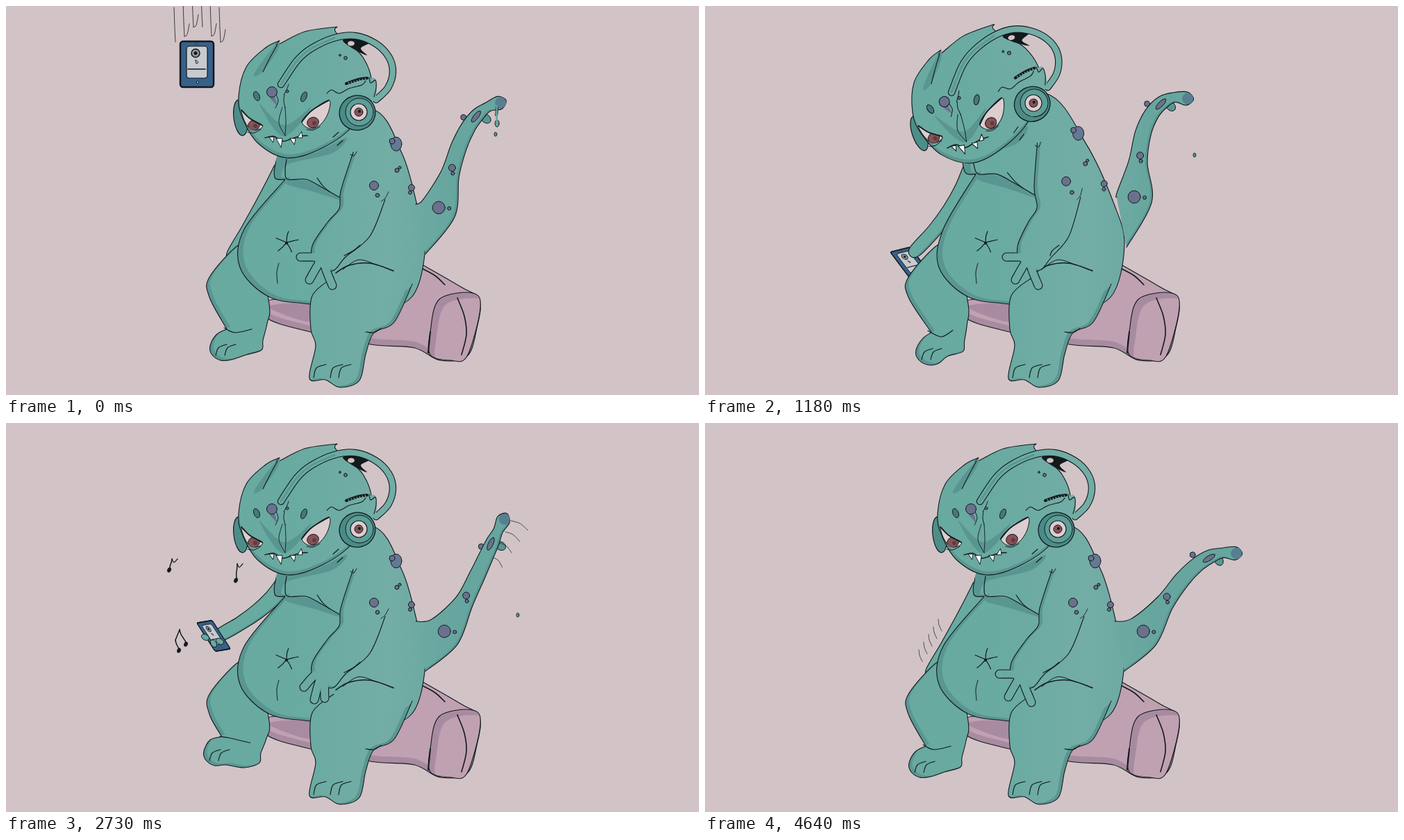
Write an HTML page with a canvas that moves like this. It is 998 by 561 pixels and loops after 4.73 s.

```html
<!DOCTYPE html>
<html lang="en">
<head>
<meta charset="utf-8">
<title>Listening monster</title>
<style>
html, body { margin: 0; width: 100%; height: 100%; overflow: hidden; background: #d2c3c6; }
canvas { display: block; }
</style>
</head>
<body>
<canvas id="stage" width="998" height="561"></canvas>
<script>
const g = document.getElementById('stage').getContext('2d');
const LOOP = 4730, STEPS = 52;
const BACKDROP = '#d2c3c6', LINE = '#121a1c', SHADE = '#5a9691', PURPLE = '#6b718d', LOG = '#bfa1b2',
  LOGSHADE = '#a88ba0', WHITE = '#dccdd0', IRIS = '#865356';
const SKIN = g.createLinearGradient(300, 0, 650, 0);
[[0, '#68a9a0'], [.35, '#69aaa1'], [.7, '#73ada6'], [1, '#66a69e']].forEach(s => SKIN.addColorStop(...s));

const clamp = v => Math.min(1, Math.max(0, v));
const ramp = (n, from, to) => clamp((n - from) / (to - from));
const mix = (a, b, u) => a.map((v, i) => v + (b[i] - v) * u);
const same = (x, y) => [x, y];
let warp = same;

// Value of a keyed track [[step, values], ...]
function at(track, n) {
  let value = track[0][1];
  for (let i = 1; i < track.length; i++) value = mix(value, track[i][1], ramp(n, track[i - 1][0], track[i][0]));
  return value;
}

// Smooth curve through points; a doubled point makes a corner
function curve(pts, closed) {
  const p = [], path = new Path2D();
  for (let i = 0; i < pts.length; i += 2) p.push(warp(pts[i], pts[i + 1]));
  const n = p.length, q = j => closed ? p[(j + n) % n] : p[Math.min(n - 1, Math.max(0, j))];
  path.moveTo(...p[0]);
  for (let i = 0; i < n - !closed; i++) {
    const [a, b, c, d] = [q(i - 1), q(i), q(i + 1), q(i + 2)];
    if (b[0] === c[0] && b[1] === c[1]) continue;
    path.bezierCurveTo(b[0] + (c[0] - a[0]) / 6, b[1] + (c[1] - a[1]) / 6,
      c[0] - (d[0] - b[0]) / 6, c[1] - (d[1] - b[1]) / 6, ...c);
  }
  return path;
}
function paint(path, fill, w, color = LINE) {
  if (fill) { g.fillStyle = fill; g.fill(path); }
  if (w) { g.lineWidth = w; g.strokeStyle = color; g.stroke(path); }
}
const ink = (pts, w = 1.1, color) => paint(curve(pts), null, w, color);
const blob = (pts, fill, w = 0) => paint(curve(pts, true), fill, w);

// Outlined shape whose shaded rim shows where its lit copy is shifted away
function form(pts, dx, dy, closed = true, fill = SKIN, shade = SHADE) {
  const path = curve(pts, closed);
  g.save();
  g.clip(path);
  paint(path, shade);
  g.translate(dx, dy);
  paint(path, fill);
  g.restore();
  paint(path, null, 1.1);
}
function oval(x, y, rx, ry, fill, w = 1, turn = 0) {
  const path = new Path2D();
  path.ellipse(...warp(x, y), rx, ry, turn, 0, 7);
  paint(path, fill, w);
}
const dot = (x, y, r, fill = PURPLE, w = 1) => oval(x, y, r, r, fill, w);

// Tapered limb along [x, y, radius] joints; base is an optional half-width vector
function limb(joints, base) {
  const left = [], right = [], last = joints.length - 1;
  let tip;
  joints.forEach(([x, y, r], i) => {
    const a = joints[Math.max(0, i - 1)], b = joints[Math.min(last, i + 1)];
    const turn = Math.atan2(b[1] - a[1], b[0] - a[0]);
    const [nx, ny] = base && !i ? base : [-Math.sin(turn) * r, Math.cos(turn) * r];
    left.push(x - nx, y - ny);
    right.unshift(x + nx, y + ny);
    tip = [x + Math.cos(turn) * r, y + Math.sin(turn) * r];
  });
  form([...left, ...tip, ...right], -3, -1, false);
}

const TAIL_LENGTHS = [40, 52, 42, 31, 23, 18, 18], TAIL_WIDTHS = [36, 26, 13.5, 11.5, 10.5, 9.5, 7, 9.5];
// [tilt, curl] in degrees
const TAIL_REST = [[7, [-18, 65]], [12, [-32, 105]], [13, [-32, 105]], [18, [-7, 68]], [22, [-7, 68]], [24, [0, 70]]];

function tailPose(n, lean) {
  const swing = (1 + Math.cos(2 * Math.PI * (n - 29) / 5.5)) / 2;
  const [tilt, curl] = n < 24 ? at(TAIL_REST, n) : [0, -95 + 165 * swing ** 1.5];
  let x = 597 + 3 * lean, y = 322 - 10 * lean;
  return TAIL_WIDTHS.map((r, i) => {
    const joint = [x, y, r];
    const heading = (-67 + 36 * .28 ** i + tilt + curl * (i / 6) ** 1.7) * Math.PI / 180;
    x += TAIL_LENGTHS[i] * Math.cos(heading);
    y += TAIL_LENGTHS[i] * Math.sin(heading);
    return joint;
  });
}

function tail(n, lean) {
  const joints = tailPose(n, lean), [, [bx, by], [mx, my], , [kx, ky], [sx, sy], , [tx, ty]] = joints;
  const turn = Math.atan2(sy - ky, sx - kx);
  dot(kx - 7, ky - 14, 4);
  oval(sx + 11, sy + 6, 6, 8, SHADE, 1, turn);
  limb(joints, [7, 36]);
  dot(bx, by - 1, 9);
  dot(bx + 15, by, 2.5);
  dot(mx + 3, my - 9, 5);
  dot(mx + 4, my - 1, 2.5);
  oval(sx - 3, sy + 3, 10, 3.5, PURPLE, 1, turn);
  dot(tx + 1, ty, 8, '#587f91', 0);
  if (n < 3) {
    ink([tx - 4, ty + 7, tx - 5, ty + 18], 4);
    ink([tx - 4, ty + 5, tx - 5, ty + 18], 2.5, SKIN);
    oval(tx - 4, ty + 30, 3, 5, SKIN);
    ink([tx - 5, ty + 16, tx - 4, ty + 30], 2.5, SKIN);
  }
  if (n <= 24) return;
  const before = tailPose(n - 1, 0);
  joints.slice(4).forEach(([x, y], i) => {
    const dx = before[i + 4][0] - x;
    if (dx > 12) ink([x + 10, y + 2, x + 14 + dx * .2, y + 6, x + 16 + dx * .4, y + 16], .7);
  });
}

// start step, x, y
const DROPS = [[0, 705, 185], [13, 705, 215], [15, 696, 245], [18, 735, 244], [29, 734, 251], [36, 710, 200], [42, 637, 219]];
function drops(n) {
  for (const [start, x0, y0] of DROPS) {
    const k = n - start, x = x0 + 3 * k, y = y0 + 22 * k + 3.9 * k * k;
    if (k < 0 || y > 640) continue;
    if (y < 525) oval(x, y, 2, 3, '#4f958c', .8);
    else for (const s of [-1, 1]) {
      ink([x + s * 3, 539, x + s * 8, 535], .8, '#9db3b2');
      ink([x, 546, x + s * 4, 543, x + s * 8, 542], 1, '#9db3b2');
    }
  }
}

function log() {
  form([596,371, 596,371, 655,405, 682,424, 678,465, 664,505, 625,511, 588,493, 525,488, 430,468, 376,450, 376,425, 560,400],
    0, -9, true, LOG, LOGSHADE);
  form([611,503, 611,470, 624,423, 672,414, 683,436, 664,505, 640,511], 9, 8, true, LOG, LOGSHADE);
  blob([380,432, 440,430, 440,455, 400,445], LOGSHADE);
  ink([650,421, 660,447, 663,474, 656,503], 1.6);
  ink([608,500, 611,470], 2);
  ink([598,378, 618,389, 632,402], 1.6);
}

// elbow x, y, hand x, y
const HANG = [372, 285, 326, 360], REACH = [340, 290, 280, 500], LIFT = [362, 295, 302, 354], HOLD = [372, 272, 308, 306];
const ARM = [[7, HANG], [10, REACH], [11, REACH], [13, LIFT], [17, HOLD], [48, HOLD], [50, HANG]];
function leftArm(n, lean) {
  const [ex, ey, hx, hy] = at(ARM, n), joints = [];
  for (let u = 0; u <= 1; u += .25) {
    const v = 1 - u, bezier = (a, b, c) => v * v * a + 2 * u * v * b + u * u * c;
    joints.push([bezier(398 - 14 * lean, ex, hx), bezier(236, ey, hy), 13 - 4 * u]);
  }
  limb(joints);
}

const UPRIGHT = [1, 0, 0, 1, 275, 84], FLAT = [0, -.56, 1, 0, 264, 516], RAISED = [.6, -.15, .45, .6, 296, 371],
  GRIP = [.46, -.08, .4, .62, 299, 307];
const PICKUP = [[10, FLAT], [13, RAISED], [17, GRIP]];

function box(x, y, w, h, fill, line) {
  const path = new Path2D();
  path.roundRect(x, y, w, h, 4);
  paint(path, fill, line);
}
function phone(n) {
  if (n > 48) return;
  const m = n < 5 ? mix(UPRIGHT, FLAT, (n / 5) ** 1.6) : at(PICKUP, n);
  g.save();
  g.transform(...m);
  box(-24, -33, 48, 66, '#36618b', 2.5);
  box(-15, -26, 30, 46, '#c7cbd0', 1.2);
  dot(-2, -16, 6, '#8e959b', 1.5);
  dot(-2, -16, 2.5, LINE, 0);
  ink([-2, -6, 2, -3, -1, -1, -2, -6], 1);
  ink([-13, 7, 12, 7], 1.6);
  dot(-1, -30, 1.4, WHITE);
  dot(1, 26, 1.6, WHITE);
  g.restore();
  if (n > 6) return;
  const reach = n < 5 ? 1 : .5;
  for (let i = 0; i < 6; i++) {
    const x = m[4] - 33 + 13 * i, y = m[5] - 12 - 32 * reach + 12 * Math.cos(i * 1.25);
    ink([x, y - 50 * reach, x + 1, y - 20 * reach, x + 2, y], .8);
    if (i % 3) ink([x + 2, y, x + 6, y - 3, x + 9, y - 18 * reach], .8);
  }
}
function grip() {
  for (const [x, y, turn] of [[287, 309, .5], [299, 318, 1], [308, 315, .5]]) oval(x, y, 6, 4, SKIN, 1, turn);
}

function leftLeg(dx, dy) {
  warp = (x, y) => {
    const k = ramp(y, 450, 470) * (x < 345 ? 1 : .35);
    return [x + dx * k, y + dy * k];
  };
  form([336,344, 293,391, 293,420, 318,466, 318,466, 303,474, 294,490, 296,502, 309,511, 325,510, 346,503, 368,496,
    370,482, 376,458, 379,430, 360,350], 5, -3);
  ink([314,464, 330,471, 354,466], 1.2);
  for (const x of [302, 315]) ink([x, 504, x + 4, 493, x + 16, 488]);
  warp = same;
}

function torso() {
  form([420,170, 392,215, 387,247, 402,250, 402,250, 343,322, 337,377, 378,419, 438,430, 520,440, 584,420, 604,345,
    592,287, 570,212, 526,148], 8, -3);
  blob([392,216, 440,213, 490,190, 470,212, 407,228, 395,246], SHADE);
  blob([406,250, 440,254, 481,279, 440,267, 406,258], SHADE);
  ink([404,221, 402,238, 406,250, 432,250, 456,262, 480,276], 1.2);
  ink([448,248, 456,259, 466,268]);
  ink([393,371, 390,384, 391,400], 1);
  for (let i = 0; i < 5; i++) {
    const a = i * 1.26 - 1.5;
    ink([404, 341, 404 + 9 * Math.cos(a), 341 + 9 * Math.sin(a), 404 + 17 * Math.cos(a + .1), 341 + 16 * Math.sin(a)], 1.2);
  }
  dot(404, 342, 2, LINE, 0);
  oval(562, 199, 8, 10, '#647994');
  for (const [x, y, r] of [[556, 195, 4], [563, 237, 3], [567, 233, 2], [584, 262, 4.5], [582, 269, 2.5]]) dot(x, y, r);
}

function rightLeg() {
  form([472,391, 441,418, 439,466, 446,490, 437,537, 460,539, 481,550, 509,540, 518,502, 530,471, 559,456, 585,401],
    -5, -2, false);
  blob([474,393, 500,372, 550,376, 584,402, 540,420], SKIN);
  ink([475,385, 494,374, 525,371, 558,382], 1.5);
  ink([485,380, 508,366, 535,374], 1);
  ink([518,470, 530,471, 540,465], 1.2);
  for (const x of [443, 467, 479]) ink([x, 536, x + 4, 522, x + 18, 517]);
}

function rightArm(closed) {
  const tips = closed ? [429,381, 444,399, 459,397] : [424,362, 437,395, 470,403];
  const fingers = (w, color) => {
    for (let i = 0; i < 6; i += 2) ink([464, 363, 447 + i * 3, 362 + i * 3, tips[i], tips[i + 1]], w, color);
  };
  fingers(13);
  form([500,211, 482,267, 480,292, 463,312, 441,346, 445,370, 470,382, 489,362, 524,332, 546,279], 5, -2, false);
  fingers(10.8, SKIN);
  ink([496,214, 501,216, 505,210], 1);
  ink([487,360, 500,353, 510,345], 1.2);
  ink([540,282, 546,277, 551,268], .9);
  dot(530, 259, 6.5);
  dot(535, 273, 2.8);
}

const EYES = [
  { x: 442, y: 168, lid: [426,167, 440,151, 465,136], rim: [464,154, 453,171, 438,177] },
  { x: 357, y: 172, lid: [339,150, 351,162, 369,172], rim: [364,178, 353,178, 344,167] }];
function eyes(n) {
  const looksDown = n > 2 && n < 9, squints = n > 41 && n < 45;
  for (const { x, y, lid, rim } of EYES) {
    const shape = curve([...lid, ...rim], true);
    paint(shape, WHITE, 1);
    g.save();
    g.clip(shape);
    oval(x - looksDown * 3, y + looksDown * 2, 8.5, 7.5, looksDown ? '#b9646a' : IRIS, 1, -.4);
    dot(x + 2, y + 1, 3, '#603a40', 0);
    if (squints) ink(lid, 18, SKIN);
    g.restore();
    g.save();
    if (squints) g.translate(3, 8);
    ink(lid, 1.7);
    g.restore();
    ink([x - 9, y + 10, x, y + 11, x + 10, y + 6], 1);
  }
}

function headphones() {
  blob([485,50, 502,46, 524,52, 511,61, 520,71, 504,64], LINE);
  oval(497, 54, 5, 3.5, BACKDROP, 0);
  const band = [396,113, 419,79, 440,61, 473,46, 503,43, 532,54, 551,73, 557,95, 550,118, 533,135];
  ink(band, 10.5);
  ink(band, 8.3, SKIN);
  ink(band.slice(0, 8), 2.5, SHADE);
  blob([466,126, 494,119, 524,105, 533,108, 530,136, 500,150, 480,145], SKIN);
  ink([462,126, 469,121, 480,126, 494,119, 512,114, 518,108]);
  ink([523,103, 525,111, 532,107, 533,118, 530,131]);
  ink([490,112, 507,106, 520,104], 4);
  for (let i = 0; i < 7; i++) ink([493 + i * 4, 110 - i, 494 + i * 4, 112 - i], 1, '#a6bcba');
  oval(506, 154, 26, 25, '#4a8b87', 1.3, -.3);
  dot(509, 153, 20, '#5c9e97');
  dot(508, 153, 12, WHITE, 1.2);
  dot(508, 153, 6, IRIS);
  dot(509, 152, 2, LINE, 0);
}

function head(n, lean) {
  g.save();
  g.translate(508 - 35 * lean, 153 - 13 * lean);
  g.rotate(-.213 * lean);
  g.translate(-508, -153);
  oval(338, 161, 10, 26, '#4e8e89', 1.2, -.12);
  form([335,130, 346,88, 374,60, 394,50, 394,50, 391,56, 430,37, 477,30, 477,30, 476,39, 514,74, 526,118, 500,172,
    455,205, 405,219, 363,198, 340,160], 1, -5);
  blob([393,52, 390,66, 367,97, 357,99, 372,76], SHADE);
  blob([365,141, 401,172, 440,145, 400,188], SHADE);
  headphones();
  eyes(n);

  for (const s of [-1, 1]) {
    ink([400 + s * 2, 146, 398 + s * 5, 168, 402, 187], .9);
    ink([395 + s * 6, 128, 396 + s * 4, 137, 395 + s * 7, 147], 1);
  }
  ink([391,55, 379,77, 370,95], 1.1);
  ink([407,113, 404,121, 400,128], 1);
  blob([380,132, 387,132, 390,143, 386,139], PURPLE);
  for (const [x, y, r] of [[383, 124, 7.5], [405, 123, 2], [489, 75, 2.4], [481, 71, 1.4]]) dot(x, y, r);
  oval(361, 130, 4, 7, '#467879', 1, -.4);
  oval(429, 131, 3.8, 7.5, '#467879', 1, .4);

  ink([373,190, 386,188, 398,195, 410,192, 423,188, 434,187], 1.5);
  for (const [x, y, w, h] of [[379, 189, 7, 8], [389, 191, 9, 13], [409, 191, 8, 9], [420, 190, 7, -9]])
    blob([x, y, x, y, x + w, y, x + w, y, x + w * .8, y + h, x + w * .8, y + h], '#fff', 1);
  for (const x of [471, 477]) ink([x, 2 * x - 753, x + 8, 2 * x - 760], 1.2);
  g.restore();
}

// head x, y, sideways reach and height of the stem
const DANGLING = [[281, 268, -7, 28], [329, 258, 9, 25], [267, 319, -9, 18], [265, 333, -14, 32]];
const STANDING = [[235, 212, 4, 16], [331, 227, 2, 24], [249, 328, -5, 15], [259, 319, -9, 21]];
function notes(standing) {
  (standing ? STANDING : DANGLING).forEach(([x, y, dx, h], i) => {
    const top = [x + dx, y - h], sway = standing ? 0 : 4;
    oval(x, y, 2.5, 3.5, LINE, .5, standing ? .4 : -.3);
    ink([x + 2, y, x + dx * .3 + sway, y - h * .35, x + dx * .8 - sway, y - h * .7, ...top], 1.5);
    if (i < 2 && standing) ink([...top, x + dx + 3, y - h + 5, x + dx + 8, y - h], 1.2);
  });
  if (standing) ink([244, 313, 250, 298], 1.5);
}

function draw(n) {
  const lean = ramp(n, 6, 9) - ramp(n, 14, 17);
  const playing = n > 16 && n < 49;
  const beat = playing && Math.floor((n + 2) / 3) % 2 === 0;
  const bend = (x, y) => {
    const k = clamp((300 - y) / 145) * lean;
    return [x - 35 * k, y - 22 * k];
  };
  paint(curve([0,0, 0,0, 998,0, 998,0, 998,561, 998,561, 0,561, 0,561], true), BACKDROP);
  log();
  phone(n);
  leftArm(n, lean);
  if (playing) { phone(n); grip(); }
  leftLeg(beat ? -9 : 10 * lean, beat ? -17 : 6 * lean);
  warp = bend;
  torso();
  warp = same;
  tail(n, lean);
  rightLeg();
  warp = (x, y) => {
    const [bx, by] = bend(x, y);
    return [bx + 10 * lean * ramp(y, 300, 350) * (x < 490), by];
  };
  rightArm(n > 15 && n < 50);
  warp = same;
  head(n, lean);
  drops(n);
  if (playing) notes(beat);
  if (n > 49) for (let i = 0; i < 5; i++) ink([336 - 7 * i, 283 + 11 * i, 337 - 7 * i, 291 + 11 * i, 341 - 7 * i, 300 + 11 * i], .7);
}

g.lineCap = g.lineJoin = 'round';
function tick() {
  draw(Math.floor((performance.now() + 10) / LOOP * STEPS) % STEPS);
  requestAnimationFrame(tick);
}
tick();
</script>
</body>
</html>
```
